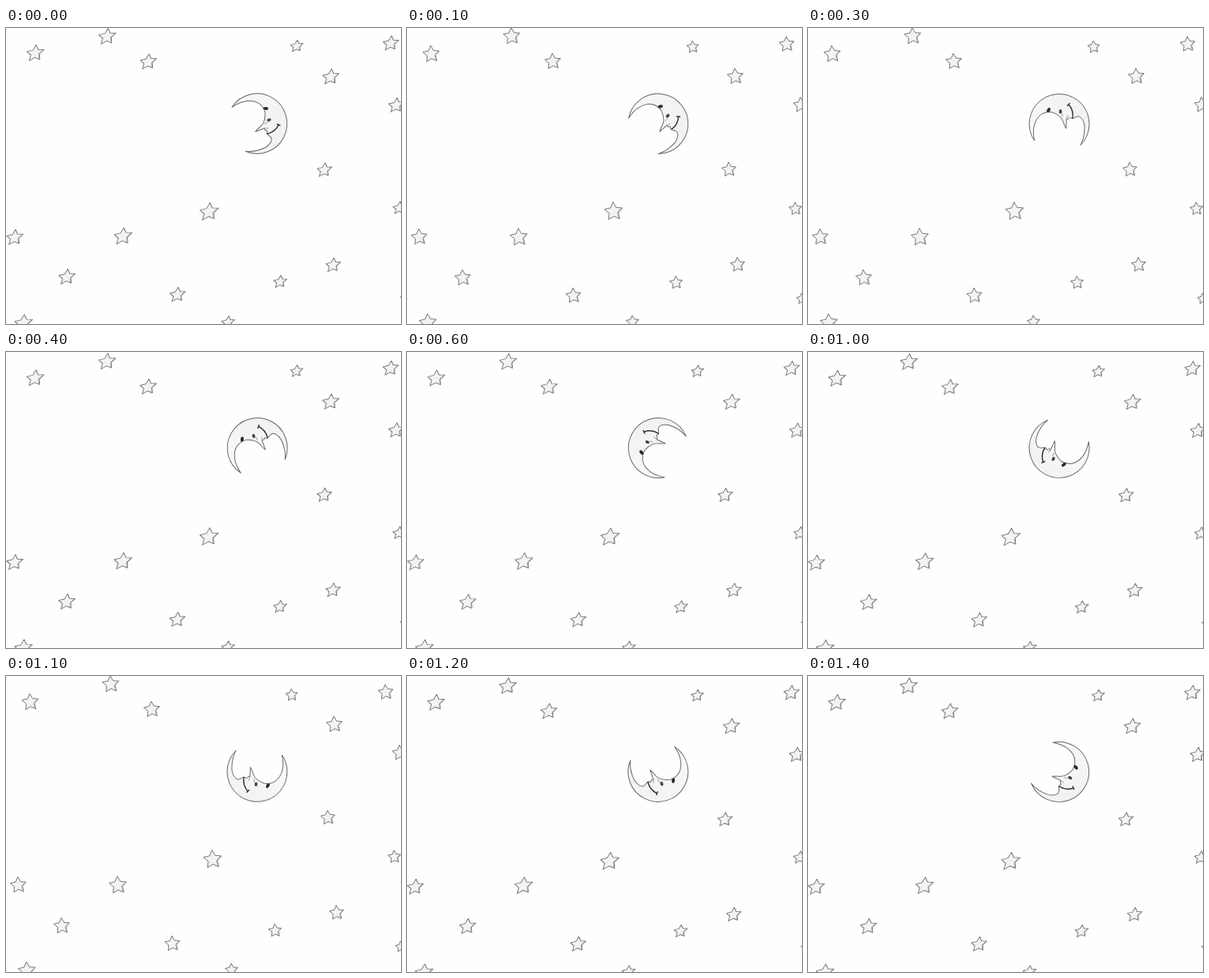
An HTML page that plays this animation: 500 px wide and 375 px high, repeating every 1500 ms.

```html
<!DOCTYPE html>
<html lang="en">
<head>
<meta charset="utf-8">
<title>Moon and stars</title>
<style>
  html, body { margin: 0; width: 100%; height: 100%; overflow: hidden; background: #fefefe; }
  svg { display: block; width: 500px; height: 375px; }
  .body { fill: url(#tone); stroke: #626262; stroke-width: .95; stroke-linejoin: round; }
  .star { fill: #f3f3f3; stroke: #747474; stroke-width: .95; stroke-linejoin: round; }
  .shade { fill: none; stroke: #999; stroke-width: .9; stroke-linecap: round; }
  .smile { fill: none; stroke: #333; stroke-width: 1.5; stroke-linecap: round; }
  .eye { fill: #2c2c2c; }
  .soft { fill: #444; }
</style>
</head>
<body>
<svg viewBox="0 0 500 375">
  <defs>
    <linearGradient id="tone" x1="0" y1="0" x2="1" y2="1">
      <stop offset="0" stop-color="#fafafa"/>
      <stop offset="1" stop-color="#f0f0f0"/>
    </linearGradient>
  </defs>
  <g id="upright"></g>
  <g id="swung"></g>
  <g id="moon">
    <path class="body" d="M-23.5-30A38 38 0 1 1-25.5 28.5C-17 32.5-7 33 0 32C7 30.5 12 26 10.5 22
      C9.5 19.5 7.5 18 7.5 15.5L9 13L6.5 11L7 8.8L-5.5 9C-3 6.5 5 5 8 1.5
      C11-2 13-6 14-10C14.5-16 13-20 10-24C4-31-8-34.5-23.5-30Z"/>
    <path class="smile" d="M8 16.5Q18 17.5 25 10.5M23.5 9L26.5 11.5"/>
    <ellipse class="eye" cx="16.5" cy="-14.5" rx="3.2" ry="2" transform="rotate(25 16.5 -14.5)"/>
    <ellipse class="soft" cx="15.6" cy=".6" rx="2.7" ry="1.9"/>
    <path class="shade" d="M9 3.5L13 3M7 9L11 10"/>
  </g>
</svg>
<script>
const STEP = 100, COUNT = 15, TURN = 360 / 16;

// Each star: x, y, radius. One flock swings left, the other right.
const flocks = [
  { shift: [-6.3, 1.2], stars: [
    [37, 32, 11], [368, 23, 8], [487, 19.5, 10], [498, 228, 8.5], [148, 264, 11.5], [77, 315.5, 10.5],
    [217, 338, 10], [347, 321.5, 8.5], [506, 342, 7]] },
  { shift: [4.6, -.5], stars: [
    [128, 11, 11], [180, 43, 10.5], [411, 62, 10.5], [494, 98, 10], [403, 180, 9.5], [257, 233, 12],
    [11, 265.5, 10.5], [414, 300.5, 9.5], [22, 374, 11.5], [281, 373, 8.5]] }
];

const $ = id => document.getElementById(id);

function starMarkup(x, y, r, pose) {
  const pts = Array.from({ length: 10 }, (_, i) => {
    const a = (i * 36 - 90) * Math.PI / 180;
    const d = r * (i % 2 ? .5 : 1);
    return [d * Math.cos(a), d * Math.sin(a)].map(v => v.toFixed(1));
  });
  const line = list => "M" + list.join("L");
  return `<g transform="translate(${x} ${y}) ${pose}">
    <path class="star" d="${line(pts)}Z"/>
    <path class="shade" transform="scale(.84)" d="${line(pts.slice(2, 5))}"/></g>`;
}

const sky = (swing, pose) => flocks.map(({ shift: [dx, dy], stars }) =>
  stars.map(([x, y, r]) => starMarkup(x + dx * swing, y + dy * swing, r, pose)).join("")).join("");

$("upright").innerHTML = sky(0, "rotate(-6) skewX(-12) scale(1.04 .95)");
$("swung").innerHTML = sky(1, "rotate(-4)");

function draw(now) {
  const n = Math.floor(now / STEP) % COUNT;
  const odd = n % 2 === 1;
  const sink = 2 * (1 - Math.exp(-n / 4));
  $("upright").style.display = odd ? "none" : "";
  $("swung").style.display = odd ? "" : "none";
  $("upright").setAttribute("transform", `translate(${-n * .05} ${sink})`);
  $("moon").setAttribute("transform",
    `translate(318 ${121 + sink * .3}) rotate(${-19 - n * TURN})`);
}

let start;
function tick(now) {
  start ??= now;
  draw(now - start);
  requestAnimationFrame(tick);
}
draw(0);
requestAnimationFrame(tick);
</script>
</body>
</html>
```
